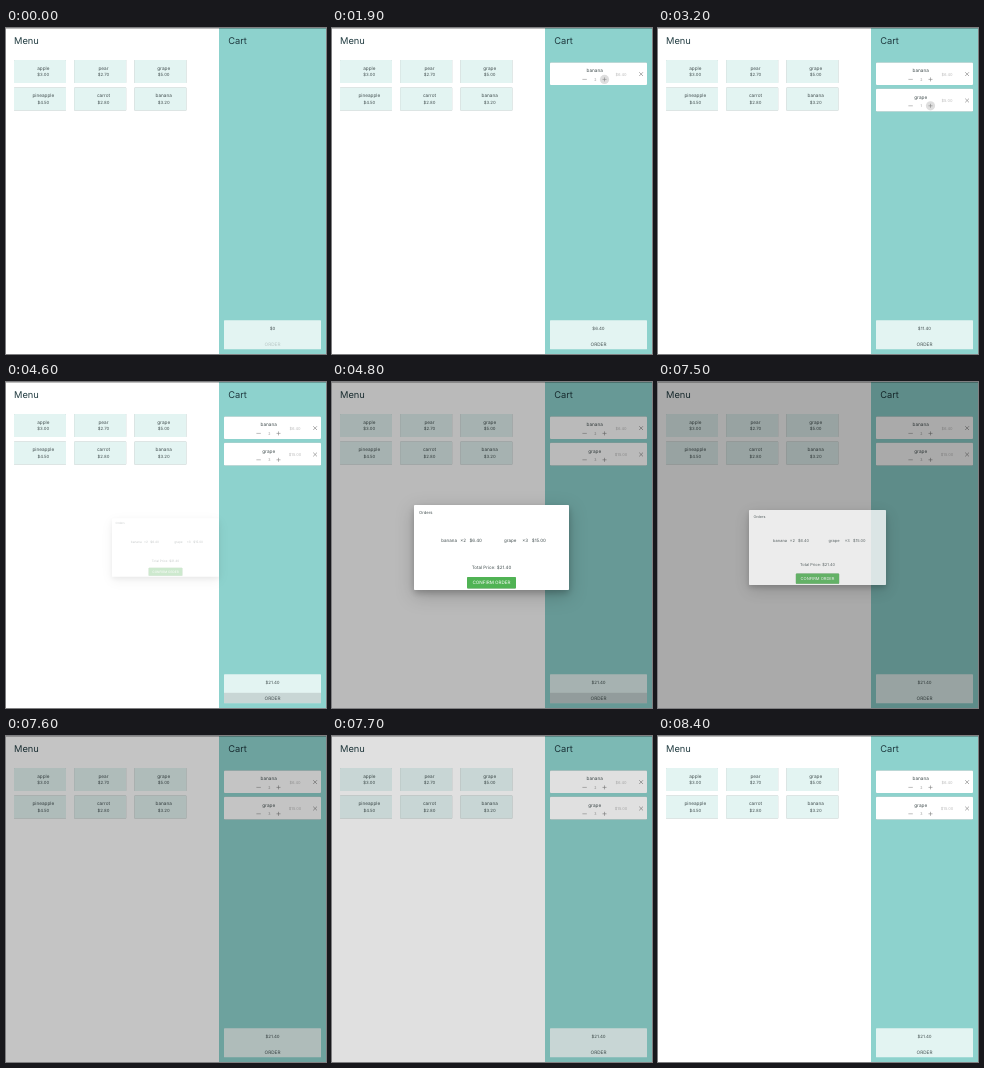
Animation of 320 by 326 pixels, one loop 8900 ms. Source, as an HTML page:

```html
<!DOCTYPE html>
<html lang="en">
<head>
<meta charset="utf-8">
<title>Menu and cart</title>
<style>
  html, body { margin: 0; width: 100%; height: 100%; overflow: hidden; background: #fff; }
  svg { display: block; width: 320px; height: 326px; }
  text { font-family: Inter, "Open Sans", sans-serif; text-rendering: geometricPrecision; fill: #434f50; }
  .card { filter: drop-shadow(0 .5px .6px rgba(0, 0, 0, .32)); }
  #dialogPanel {
    filter: drop-shadow(0 3.5px 3px rgba(0, 0, 0, .2)) drop-shadow(0 5px 9px rgba(0, 0, 0, .2));
  }
  #dialog { transform-origin: 159.5px 165.5px; }
</style>
</head>
<body>
<svg id="stage" viewBox="0 0 320 326"></svg>
<script>
const NS = "http://www.w3.org/2000/svg";
const LOOP = 8900, STEP = 100;
const MINT = "#e3f4f2", TEAL = "#8dd2cd", FAINT = "#bdbdbd";
const stage = document.getElementById("stage");

function add(parent, tag, attrs = {}) {
  const node = document.createElementNS(NS, tag);
  for (const key in attrs) node.setAttribute(key, attrs[key]);
  return parent.appendChild(node);
}

const box = (parent, x, y, width, height, fill, more) =>
  add(parent, "rect", { x, y, width, height, fill, ...more });

// x is the anchor point, y the middle of the capitals
function label(parent, text, x, y, size = 4.7, more = {}) {
  const node = add(parent, "text", {
    x, y: y + size * .36, "font-size": size, "text-anchor": "middle", ...more
  });
  node.textContent = text;
  return node;
}

const show = (node, opacity) => { node.style.opacity = opacity; };
const money = value => "$" + (value ? value.toFixed(2) : "0");

// Linear interpolation through [time, value] pairs
function track(t, keys) {
  if (t <= keys[0][0]) return keys[0][1];
  for (let i = 1; i < keys.length; i++) {
    const [t0, v0] = keys[i - 1], [t1, v1] = keys[i];
    if (t < t1) return v0 + (v1 - v0) * (t - t0) / (t1 - t0);
  }
  return keys[keys.length - 1][1];
}

const countAt = (t, clicks) => clicks.filter(time => t >= time).length;
const within = (t, from, to) => t >= from && t < to;

function menuCard(name, price, col, row) {
  const x = 8 + col * 60.2, y = 32 + row * 27.5;
  box(stage, x, y, 52, 23, MINT, { class: "card", rx: .6 });
  const ripple = box(stage, x, y, 52, 23, "#000", { rx: .6, opacity: 0 });
  label(stage, name, x + 29.3, y + 8.3);
  label(stage, money(price), x + 29.3, y + 14.7, 4.3);
  return ripple;
}

function cartCard(name, price, y, clicks) {
  const g = add(stage, "g");
  box(g, 218, y, 97, 22.7, "#fff", { class: "card", rx: .8 });
  label(g, name, 262.7, y + 8.2);
  const halo = add(g, "circle", { cx: 272.5, cy: y + 17, r: 4.6, fill: "#dedede" });
  const icon = (d, stroke) =>
    add(g, "path", { d, stroke, "stroke-width": .6, fill: "none" });
  icon(`M250.4 ${y + 17}h4.4`, "#929292");
  icon(`M270.5 ${y + 17}h4M272.5 ${y + 15}v4`, "#858585");
  icon(`M307.2 ${y + 9.8}l3.8 3.8m0 -3.8l-3.8 3.8`, "#777");
  const count = label(g, "", 263.3, y + 17, 3.6, { style: "fill:#999" });
  const cost = label(g, "", 289, y + 11.7, 4, { style: "fill:" + FAINT });
  return { g, price, clicks, halo, count, cost };
}

box(stage, 0, 0, 320, 326, "#fff");
box(stage, 213, 0, 107, 326, TEAL);
box(stage, 0, 0, 320, .7, "#000", { opacity: .38 });
const title = { "text-anchor": "start", style: "fill:#203b40" };
label(stage, "Menu", 8, 12.2, 9.3, title);
label(stage, "Cart", 222.2, 12.2, 9.3, title);

const fruit = [["apple", 3], ["pear", 2.7], ["grape", 5],
               ["pineapple", 4.5], ["carrot", 2.8], ["banana", 3.2]];
const ripples = fruit.map(([name, price], i) => menuCard(name, price, i % 3, i / 3 | 0));

const banana = cartCard("banana", 3.2, 34.4, [1100, 1900]);
const grape = cartCard("grape", 5, 60.8, [2500, 3300, 3500]);

box(stage, 218, 292.3, 97, 29, MINT, { rx: .6 });
const orderHover = box(stage, 218, 310.8, 97, 10.4, "#000");
const total = label(stage, "$0", 266.5, 300.4, 4.4);
const order = label(stage, "ORDER", 266.5, 316.2);

const backdrop = box(stage, 0, 0, 320, 326, "#000");

const dialog = add(stage, "g", { id: "dialog" });
box(dialog, 82, 123, 155, 85, "#fff", { id: "dialogPanel", rx: .8 });
const left = { "text-anchor": "start" };
label(dialog, "Orders", 87, 130.4, 4.2, left);
[["banana", 109.3], ["×2", 128.2], ["$6.40", 137.4],
 ["grape", 172], ["×3", 190.3], ["$15.00", 199.8]]
  .forEach(([text, x]) => label(dialog, text, x, 158, 4.5, left));
label(dialog, "Total Price: $21.40", 159.5, 185, 4.5);
box(dialog, 135, 195, 49, 11.6, "#50b354", { class: "card", rx: 1 });
const confirmHover = box(dialog, 135, 195, 49, 11.6, "#000", { rx: 1 });
label(dialog, "CONFIRM ORDER", 159.5, 200.8, 4.6, { style: "fill:#fff" });

function render(t) {
  let sum = 0;
  for (const item of [banana, grape]) {
    const n = countAt(t, item.clicks);
    sum += n * item.price;
    show(item.g, n ? 1 : 0);
    item.count.textContent = n;
    item.cost.textContent = money(n * item.price);
  }
  total.textContent = money(sum);
  show(order, sum ? 1 : .28);

  show(ripples[5], track(t, [[900, 0], [1100, .08], [1500, 0]]));
  show(ripples[2], track(t, [[2300, 0], [2500, .08], [2900, 0]]));
  show(banana.halo, within(t, 1900, 2200) ? 1 : 0);
  show(grape.halo, within(t, 3100, 3800) ? 1 : 0);
  show(orderHover, track(t, [[4100, 0], [4300, .12], [4800, .12], [5000, 0]]));

  show(backdrop, track(t, [[4600, 0], [4700, .16], [4800, .27], [4900, .315], [5000, .335],
    [7500, .335], [7600, .23], [7700, .12], [7800, .05], [8000, 0]]));
  show(dialog, t < 7600 ? track(t, [[4500, 0], [4600, .28], [4700, .88], [4800, 1],
    [7400, 1], [7500, .78]]) : 0);
  const scale = track(t, [[4600, .69], [4700, .95], [4800, 1], [7400, 1], [7500, .884]]);
  dialog.style.transform = `scale(${scale})`;
  show(confirmHover, track(t, [[5900, 0], [6200, .04], [7000, .04], [7200, 0]]));
}

const start = performance.now();
function tick() {
  const t = (performance.now() - start) % LOOP;
  render(Math.floor(t / STEP) * STEP);
  requestAnimationFrame(tick);
}
tick();
</script>
</body>
</html>
```
